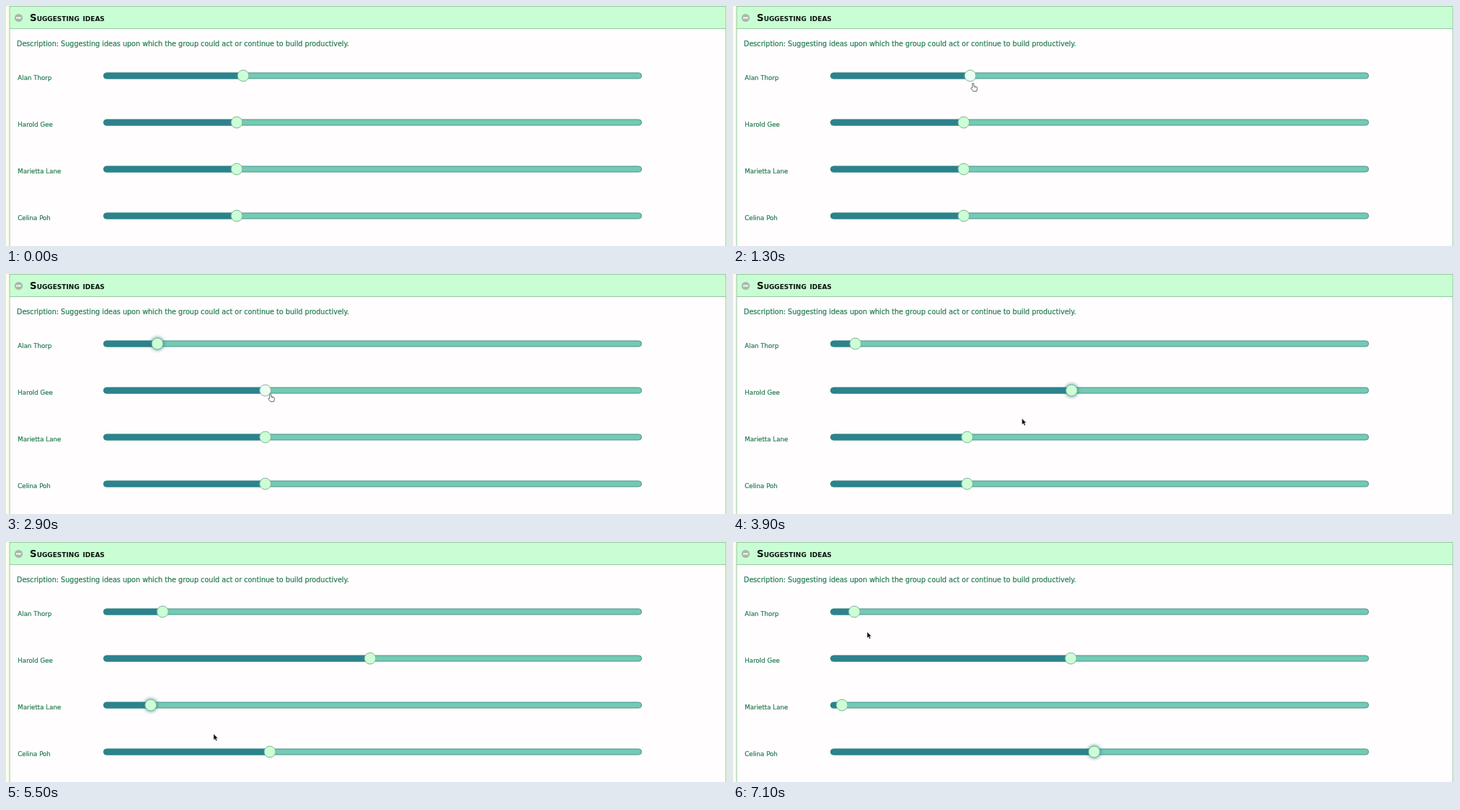
Animation of 1000x334 px, one loop 7200 ms. Source, as an HTML page:

```html
<!DOCTYPE html>
<html lang="en">
<head>
<meta charset="utf-8">
<title>Suggesting ideas</title>
<style>
  html, body { margin: 0; width: 100%; height: 100%; overflow: hidden; background: #fdfdec; }
  svg { display: block; width: 100vw; height: 100vh; }
  text { font-family: "DejaVu Sans", Verdana, sans-serif; fill: #207a50; stroke: #207a50; stroke-width: .2; }
  .title { font-size: 13.4px; font-weight: bold; font-variant: small-caps; fill: #0a120c; stroke: none; }
  .about { font-size: 9.64px; }
  .name { font-size: 8.7px; }
  .track { fill: #73cab5; stroke: #4f9386; }
  .fill { fill: #2c828d; }
  .knob { fill: #ccffd6; stroke: #80b394; }
  .knob.hover { fill: #eafff4; }
  .glow { fill: #2c828d; filter: blur(2.2px); opacity: 0; }
  .glow.on { opacity: .65; }
</style>
</head>
<body>
<svg id="stage" viewBox="0 0 1000 334" preserveAspectRatio="none">
  <rect x="5" width="993" height="334" fill="#fffdfe"/>
  <rect x="5" width="993" height="31.5" fill="#c9fdd4"/>
  <path d="M5 .5H998M5 31.5H998M5 0V334M998.5 0V334" stroke="#98c5a2" fill="none"/>
  <circle cx="17.5" cy="16.5" r="5.6" fill="#a9b8ab"/>
  <rect x="14" y="15.4" width="7" height="2.2" fill="#eef5ee"/>
  <text class="title" x="33" y="20.6">Suggesting ideas</text>
  <text class="about" x="15" y="56.3">Description: Suggesting ideas upon which the group could act or continue to build productively.</text>
  <g id="rows"></g>
  <g id="cursor" stroke-linejoin="round">
    <path id="arrow" d="M0 0V8.6L2 6.9L3.4 10L5 9.3L3.6 6.3H6.2Z" fill="#111" stroke="#fff" stroke-width=".5"/>
    <g id="hand" fill="#fff" stroke="#444" stroke-width=".8">
      <path d="M-1 1Q0 -.6 1 1V4.5L4.8 5.5Q6 6 5.8 7.6L5 11.6H0L-3 7.6Q-2.6 6 -1 7.2Z"/>
      <path d="M2.2 5V7M3.9 5.4V7.2" stroke-width=".5"/>
    </g>
  </g>
</svg>
<script>
const LOOP = 7200, STEP = 100, LEFT = 135, WIDTH = 747;
const HOLD = 100;     // pause on a knob before it is pulled
const BALANCE = 1350; // rows further below this take a larger share of a shift
const names = ["Alan Thorp", "Harold Gee", "Marietta Lane", "Celina Poh"];
const initial = [329, 320, 320, 320];

// dx, dy: where the pointer grips the knob
const drags = [
  { row: 0, start: 1350, end: 2350, move: -119, dx: 4, dy: 10 },
  { row: 1, start: 2950, end: 3600, move: 110, dx: 7, dy: 4 },
  { row: 2, start: 4300, end: 5200, move: -124, dx: 0, dy: 9 },
  { row: 3, start: 5900, end: 6800, move: 135, dx: 9, dy: 6 }
];

const $ = id => document.getElementById(id);
const rowY = i => 97 + 65 * i;
const progress = (t, a, b) => Math.min(1, Math.max(0, (t - a) / (b - a)));

function add(parent, tag, attrs) {
  const el = document.createElementNS("http://www.w3.org/2000/svg", tag);
  for (const key in attrs) el.setAttribute(key, attrs[key]);
  return parent.appendChild(el);
}

const rows = names.map((name, i) => {
  const y = rowY(i), box = $("rows");
  add(box, "text", { class: "name", x: 16.3, y: y + 6.2 }).textContent = name;
  add(box, "rect", { class: "track", x: LEFT + .5, y: y - 4, width: WIDTH - 1, height: 8, rx: 4 });
  const fill = add(box, "rect", { class: "fill", x: LEFT, y: y - 4.2, height: 8.6, rx: 4.3 });
  const glow = add(box, "circle", { class: "glow", cy: y, r: 9.5 });
  const knob = add(box, "circle", { class: "knob", cy: y, r: 7.9 });
  return { y, fill, glow, knob };
});

// pulling one knob shifts the others the opposite way, keeping the total
function knobsAt(t) {
  return drags.reduce((knobs, d) => {
    const move = d.move * progress(t, d.start, d.end);
    const share = knobs.map((x, i) => i === d.row ? 0 : BALANCE - x);
    const total = share.reduce((a, b) => a + b);
    return knobs.map((x, i) => x + (i === d.row ? move : -move * share[i] / total));
  }, initial);
}

function grip(d, t) {
  return { t, x: knobsAt(t)[d.row] + d.dx, y: rowY(d.row) + d.dy };
}

const stops = [
  { t: 500, x: 400, y: 350 },
  ...drags.flatMap(d => [grip(d, d.start - HOLD), grip(d, d.start), grip(d, d.end)]),
  { t: 7100, x: 186, y: 125 }
];

function pointerAt(t) {
  const next = Math.max(1, stops.findIndex(s => s.t >= t));
  const a = stops[next - 1], b = stops[next];
  const p = progress(t, a.t, b.t);
  return [a.x + (b.x - a.x) * p, a.y + (b.y - a.y) * p];
}

function draw(t) {
  const knobs = knobsAt(t);
  const [px, py] = pointerAt(t);
  const focus = drags.filter(d => d.start <= t).length - 1;
  let over = false;
  rows.forEach((row, i) => {
    const x = knobs[i];
    const hover = Math.hypot(px - x, py - row.y) < 12;
    over = over || hover;
    row.fill.setAttribute("width", x - LEFT);
    row.glow.setAttribute("cx", x);
    row.knob.setAttribute("cx", x);
    row.glow.classList.toggle("on", i === focus);
    row.knob.classList.toggle("hover", hover);
  });
  $("cursor").setAttribute("transform", `translate(${px} ${py})`);
  $("hand").style.display = over ? "" : "none";
  $("arrow").style.display = over ? "none" : "";
}

const start = performance.now();
function tick() {
  const t = (performance.now() - start) % LOOP;
  draw(Math.floor(t / STEP) * STEP);
  requestAnimationFrame(tick);
}
tick();
</script>
</body>
</html>
```
